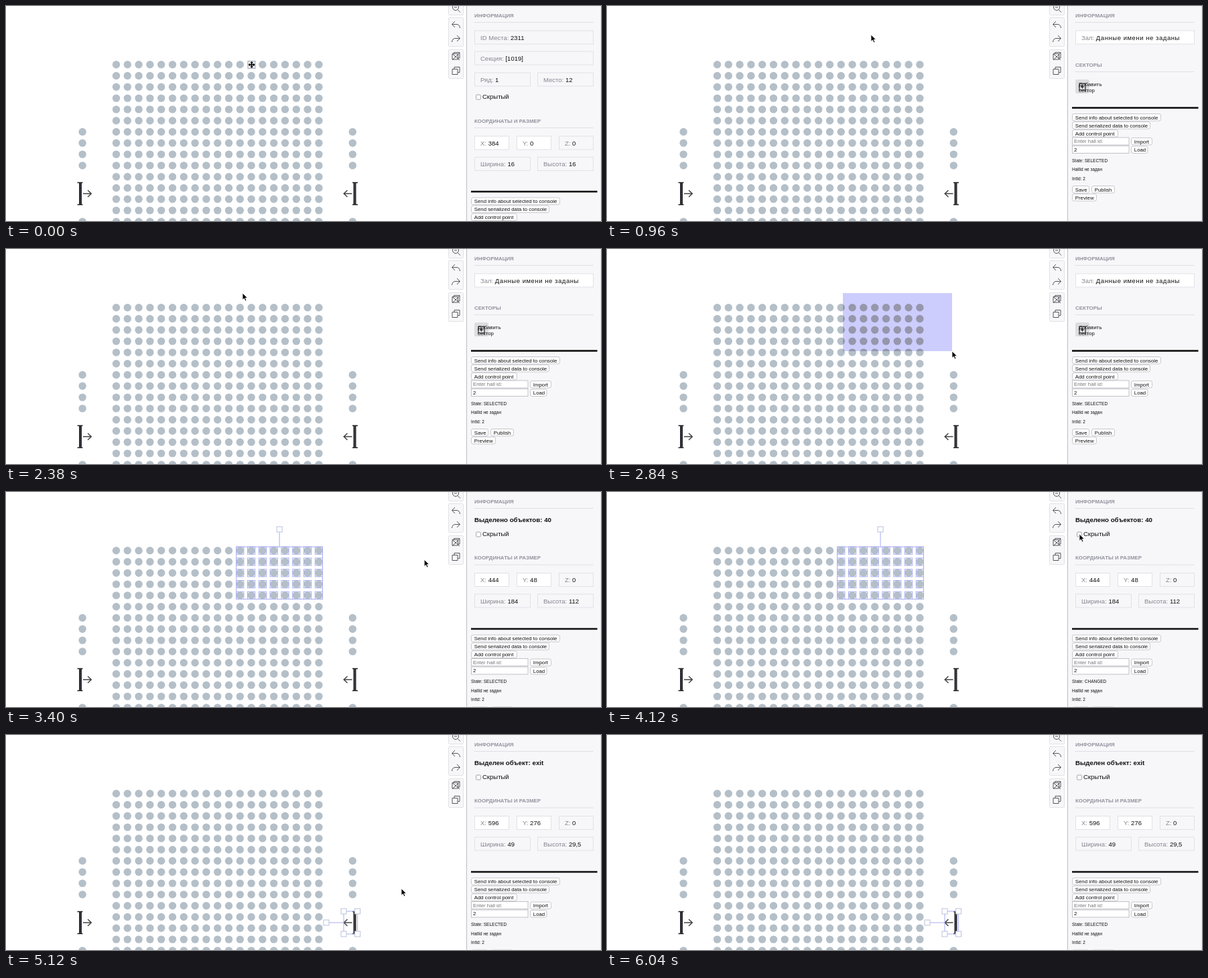
An HTML page for the animation above (6.06 s loop, 888 by 322 pixels).

```html
<!DOCTYPE html>
<html lang="ru">
<head>
<meta charset="utf-8">
<title>Hall editor</title>
<style>
html, body { margin: 0; width: 100%; height: 100%; overflow: hidden; background: #fff; }
svg { display: block; width: 888px; height: 322px; }
text { font-family: "Liberation Sans", Arial, sans-serif; font-size: 9.5px; fill: #111; }
.label { fill: #85858f; }
.head { font-size: 7.9px; font-weight: bold; fill: #92929d; }
.title { font-size: 9.7px; font-weight: bold; }
.wide { letter-spacing: .55px; }
.small { font-size: 7.8px; }
.tiny { font-size: 6.5px; }
.hint { fill: #777; }
.pick { fill: none; stroke: #a8aef0; stroke-width: 1; }
.grip { fill: #fff; stroke: #b9c2dc; stroke-width: 1; }
.icon { fill: none; stroke: #55555c; stroke-width: 1; }
</style>
</head>
<body>
<svg id="stage" viewBox="0 0 888 322"></svg>
<script>
const LOOP = 6060;
const PITCH = 16.8, HALF = 5.6;
const seatX = i => 164.5 + PITCH * i;
const seatY = j => 87.7 + PITCH * j;

const rect = (x, y, w, h, attrs = '') =>
  `<rect x="${x}" y="${y}" width="${w}" height="${h}" ${attrs}/>`;
const path = (d, attrs = 'class="icon"') => `<path d="${d}" ${attrs}/>`;
const text = (x, y, s, cls = '') => `<text x="${x}" y="${y}" class="${cls}">${s}</text>`;

// ---- canvas side ----
function seats() {
  let s = '';
  const dot = (i, j) => s += `<circle cx="${seatX(i)}" cy="${seatY(j)}" r="5.7"/>`;
  for (let j = 0; j < 15; j++) {
    for (let i = 0; i < 19; i++) dot(i, j);
    if ((j > 5 && j < 10) || j > 13) { dot(-3, j); dot(21, j); }
  }
  return s;
}

function exitSign(x, dir) {
  return `<g transform="translate(${x} 281) scale(${dir} 1)" fill="none" stroke="#333">` +
    path('M0 -16V16', 'stroke="#25252b" stroke-width="4"') +
    path('M0 -16V16', 'stroke="#777" stroke-width="1" stroke-dasharray="1 1.5"') +
    path('M-4.5 -16.5H3.5M-4.5 16.5H3.5', 'stroke="#222" stroke-width="1.6"') +
    path('M4 0H16M11 -5L16.3 0L11 5', 'stroke="#444" stroke-width="1.5"') + '</g>';
}

function toolbar() {
  const box = 'rx="1" fill="#f7f7f9" stroke="#e2e2e6"';
  return rect(660.5, -10, 22, 23.5, box) + rect(660.5, 17.5, 22, 43, box) + rect(660.5, 65.5, 22, 43, box) +
    '<circle cx="671" cy="2" r="4.5" class="icon"/>' +
    path('M669 2H673M674 5.5L678 9.5') +
    path('M670 23L665.5 27.5L670 32M666 27.5H673Q677 28 677.5 33') +
    path('M673 44L677.5 48.5L673 53M677 48.5H670Q666 49 665.5 54') +
    path('M666 71.5H674.5V80H666ZM668.5 71V69.5H677V78H675M666 71.5L677 81M677 70L666 81') +
    path('M666 94.5H674V102.5H666ZM669 94V91.5H677V99.5H674.5');
}

// ---- panel side ----
const rule = y => path(`M699 ${y}H877`, 'stroke="#c9c9d0" stroke-width="1" stroke-dasharray="1 1"');
const head = (y, s) => text(699, y + 2.9, s, 'head') + rule(y + 10.5);

function field(x, y, w, name, value, open, cls = '') {
  return rect(x + .5, y - 10, w - 1, 20, `fill="${open ? '#fff' : '#f7f7fa'}" stroke="#e1e1e7"`) +
    `<text x="${x + 9}" y="${y + 3.5}" class="label">${name}: <tspan fill="#111" class="${cls}">${value}</tspan></text>`;
}

function check(y, on) {
  return rect(701.5, y - 3, 7, 7, 'rx="1.5" fill="#fff" stroke="#8e8e94" stroke-width=".8"') +
    (on ? path(`M703 ${y + .5}L704.6 ${y + 2.3}L707.3 ${y - 1.6}`, 'fill="none" stroke="#222"') : '') +
    text(711, y + 3.2, 'Скрытый');
}

function geometry(y, g, open) {
  return head(y, 'КООРДИНАТЫ И РАЗМЕР') +
    field(699, y + 33, 52, 'X', g.x, true) +
    field(762, y + 33, 52, 'Y', g.y, true) +
    field(825, y + 33, 52, 'Z', 0) +
    field(699, y + 64.5, 84, 'Ширина', g.w) +
    field(793, y + 64.5, 84, 'Высота', g.h);
}

function button(x, y, w, s) {
  return rect(x + .5, y - 5, w - 1, 10.5, 'rx="2.5" fill="#fff" stroke="#bcbcc2" stroke-width=".8"') +
    text(x + 4.8, y + 3, s, 'small');
}

function input(y, s, cls) {
  return rect(694.5, y - 5.5, 84.5, 11, 'fill="#fff" stroke="#b5b5bb" stroke-width=".8"') +
    text(697, y + 2.8, s, 'small ' + cls);
}

function tools(y, state) {
  return rect(694, y - 1.3, 188.5, 2.6, 'fill="#111"') +
    button(694, y + 14, 133, 'Send info about selected to console') +
    button(694, y + 26, 117, 'Send serialized data to console') +
    button(694, y + 38, 69, 'Add control point') +
    input(y + 50, 'Enter hall id:', 'hint') + button(782, y + 50, 32, 'Import') +
    input(y + 62.5, '2', '') + button(782, y + 62.5, 25.5, 'Load') +
    text(694, y + 81, 'State: ' + state, 'tiny') +
    text(694, y + 94.8, 'HallId не задан', 'tiny') +
    text(694, y + 108.3, 'IntId: 2', 'tiny') +
    button(694, y + 122, 26, 'Save') + button(723, y + 122, 35, 'Publish') +
    button(694, y + 134, 37, 'Preview');
}

const panels = {
  seat: () => field(699, 47, 178, 'ID Места', 2311) +
    field(699, 78, 178, 'Секция', '[1019]') +
    field(699, 110, 84, 'Ряд', 1) + field(793, 110, 84, 'Место', 12) +
    check(136) + geometry(172, { x: 384, y: 0, w: 16, h: 16 }) + tools(278, 'SELECTED'),
  hall: () => field(699, 47, 178, 'Зал', 'Данные имени не заданы', true, 'wide') +
    head(88, 'СЕКТОРЫ') +
    rect(699, 110, 21, 21, 'rx="3" fill="#dcdce1"') +
    path('M705 116H714V126H705ZM707 121H712M709.5 118.5V123.5', 'fill="none" stroke="#222" stroke-width="1.2"') +
    text(704, 120, 'Добавить', 'small') + text(704, 129, 'сектор', 'small') +
    tools(152.5, 'SELECTED'),
  group: (g, on, state) => text(699, 45.3, 'Выделено объектов: ' + g.n, 'title') +
    check(63, on) + geometry(98.5, g) + tools(205, state),
  exit: () => text(699, 45.3, 'Выделен объект: exit', 'title') +
    check(63) + geometry(98.5, { x: 596, y: 276, w: 49, h: '29,5' }) + tools(205, 'SELECTED')
};

// ---- selections ----
const grip = (x, y) => rect(x - 4, y - 4, 8, 8, 'class="grip"');

// Seats touched by a lasso, measured in plan units (24 per seat).
function caught(a, b) {
  const first = (v, at) => Math.max(0, Math.ceil((v - HALF - at(0)) / PITCH));
  const last = (v, at) => Math.floor((v + HALF - at(0)) / PITCH);
  const i0 = first(a[0], seatX), i1 = Math.min(18, last(b[0], seatX));
  const j0 = first(a[1], seatY), j1 = last(b[1], seatY);
  const cols = i1 - i0, rows = j1 - j0;
  return { i0, i1, j0, j1, n: (cols + 1) * (rows + 1),
    x: 96 + 12 * (i0 + i1), y: 12 * (j0 + j1), w: cols * 24 + 16, h: rows * 24 + 16 };
}

function groupMarks(g) {
  let s = '';
  for (let j = g.j0; j <= g.j1; j++)
    for (let i = g.i0; i <= g.i1; i++)
      s += rect(seatX(i) - HALF, seatY(j) - HALF, 2 * HALF, 2 * HALF, 'class="pick"');
  const x = seatX(g.i0) - HALF, y = seatY(g.j0) - HALF;
  const w = g.w * .7, mid = x + w / 2;
  return s + rect(x, y, w, g.h * .7, 'class="pick"') +
    path(`M${mid} ${y}V60`, 'class="pick"') + grip(mid, 56);
}

const seatMark = () => rect(361, 82.5, 11, 11, 'fill="#eef0f3" stroke="#9da5b4"');
const exitMarks = () => rect(504, 264, 20.6, 34, 'class="pick"') +
  path('M504 281H482', 'class="pick"') + grip(478, 281) +
  grip(504, 264) + grip(524.6, 264) + grip(504, 298) + grip(524.6, 298);

// ---- timeline ----
const track = [
  [0, 366, 88], [260, 366, 88], [600, 388, 56], [900, 394, 43], [1060, 394, 43],
  [1460, 478, 128], [1560, 478, 128], [1920, 420, 58], [2060, 420, 58],
  [2340, 353, 66], [2460, 353, 66], [2820, 515, 153], [3060, 515, 153],
  [3680, 705, 63], [4220, 705, 63], [4440, 610, 150], [4520, 610, 150],
  [4780, 514, 281], [4880, 514, 281], [5010, 577, 248], [5120, 590, 230],
  [5560, 600, 236], [5900, 645, 330], [LOOP, 645, 330]
];
const lassos = [
  { from: 1060, to: 1500, a: [394, 43], b: [478, 128] },
  { from: 2460, to: 2980, a: [352, 66], b: [515, 153] }
];
const scenes = [
  [0, 'seat'], [760, 'hall'], [1500, 'group', 0], [2000, 'hall'],
  [2980, 'group', 1], [4480, 'hall'], [4840, 'exit']
];
const CHECK_ON = 3800, CHECK_OFF = 4040;

function cursorAt(t) {
  const k = track.findIndex(p => p[0] > t);
  const [t0, x0, y0] = track[k - 1], [t1, x1, y1] = track[k];
  const u = (t - t0) / (t1 - t0), e = u * u * (3 - 2 * u);
  return [x0 + (x1 - x0) * e, y0 + (y1 - y0) * e];
}

const stage = document.getElementById('stage');
stage.innerHTML =
  '<defs><clipPath id="cut"><rect id="cutBox"/></clipPath></defs>' +
  rect(0, 0, 888, 322, 'fill="#fff"') +
  `<g fill="#b4bfc8">${seats()}</g>` +
  '<rect id="lasso" fill="#cdcdfd"/>' +
  `<g clip-path="url(#cut)" fill="#9696ac">${seats()}</g>` +
  exitSign(111, 1) + exitSign(520.5, -1) +
  '<g id="marks"></g>' + toolbar() +
  rect(687, 0, 201, 322, 'fill="#f7f7fa"') +
  path('M687.5 0V322', 'stroke="#85858c" stroke-dasharray="1 1"') +
  path('M887.5 0V322', 'stroke="#ececf0"') +
  head(14, 'ИНФОРМАЦИЯ') + '<g id="panel"></g>' +
  path('M0 0V10.2L2.4 8L4.1 11.8L5.9 11L4.2 7.3H7.4Z',
    'id="arrow" fill="#000" stroke="#fff" stroke-width=".8"') +
  path('M-4 0H4M0 -4V4M-2.5 -1.5L-4 0L-2.5 1.5M2.5 -1.5L4 0L2.5 1.5M-1.5 -2.5L0 -4L1.5 -2.5M-1.5 2.5L0 4L1.5 2.5',
    'id="move" fill="none" stroke="#000" stroke-width="1.4"');

const el = id => document.getElementById(id);
const show = (node, on) => node.setAttribute('visibility', on ? 'visible' : 'hidden');
const place = (node, x, y, w, h) =>
  Object.entries({ x, y, width: w, height: h }).forEach(([k, v]) => node.setAttribute(k, v));
const groups = lassos.map(l => caught(l.a, l.b));
let shown = '';

function render(t) {
  const [x, y] = cursorAt(t);
  const grabbing = t < 320;
  el('arrow').setAttribute('transform', `translate(${x} ${y})`);
  el('move').setAttribute('transform', `translate(${x + .7} ${y})`);
  show(el('arrow'), !grabbing);
  show(el('move'), grabbing);

  const l = lassos.find(l => t >= l.from && t < l.to);
  const box = l ? [...l.a, Math.max(0, x - l.a[0]), Math.max(0, y - l.a[1])] : [0, 0, 0, 0];
  place(el('lasso'), ...box);
  place(el('cutBox'), ...box);

  const [, kind, index] = scenes.filter(s => s[0] <= t).pop();
  const checked = t >= CHECK_ON && t < CHECK_OFF;
  const state = index === 1 && t >= CHECK_ON ? 'CHANGED' : 'SELECTED';
  const key = [kind, index, checked, state].join();
  if (key === shown) return;
  shown = key;
  const g = groups[index];
  el('panel').innerHTML = panels[kind](g, checked, state);
  el('marks').innerHTML = kind === 'seat' ? seatMark()
    : kind === 'group' ? groupMarks(g)
    : kind === 'exit' ? exitMarks() : '';
}

const start = performance.now();
function tick() {
  render((performance.now() - start) % LOOP);
  requestAnimationFrame(tick);
}
tick();
</script>
</body>
</html>
```
